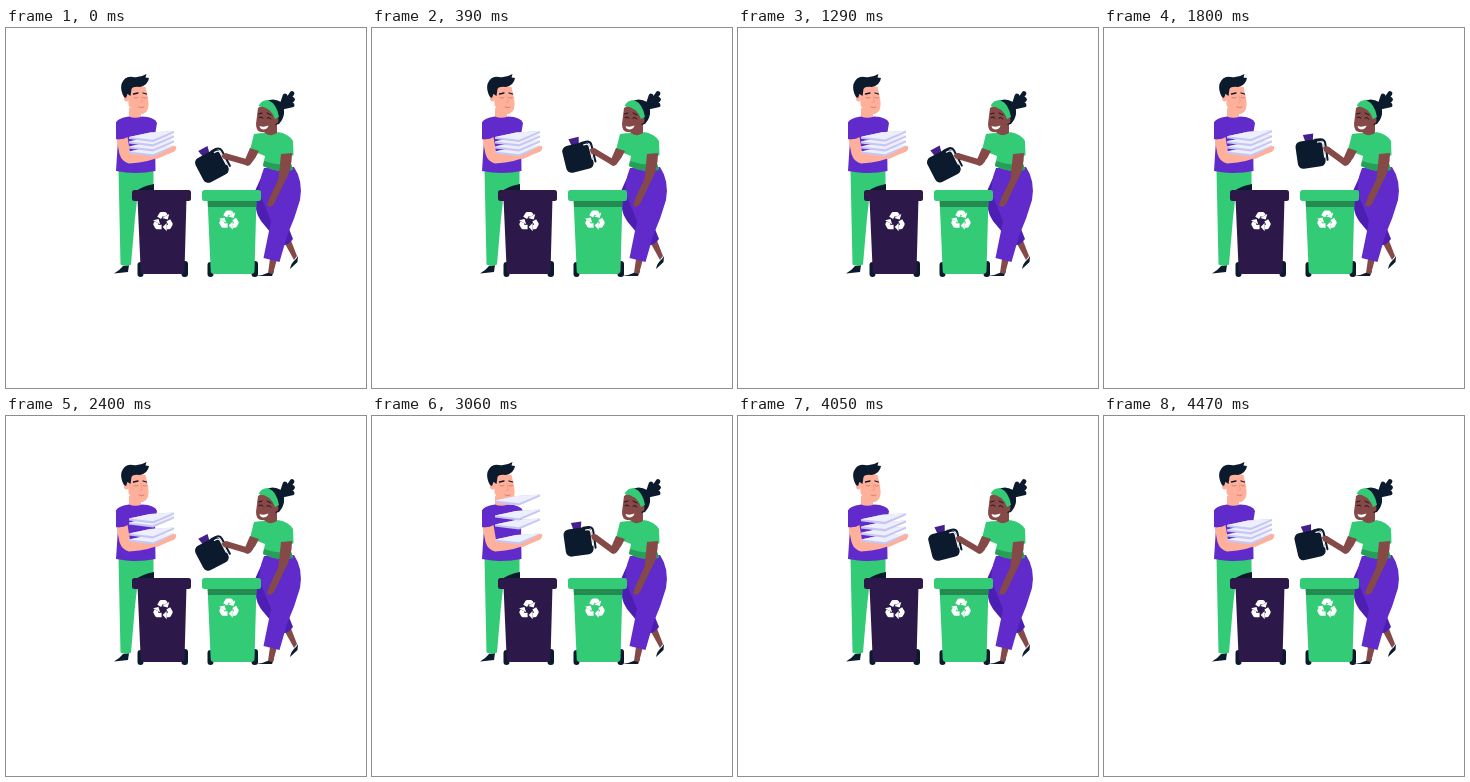
These frames come from a looping animation (360x360 px, 4.5 s). An HTML page:

```html
<!DOCTYPE html>
<html lang="en">
<head>
<meta charset="utf-8">
<style>
html, body { margin: 0; width: 100%; height: 100%; overflow: hidden; background: #fff }
svg { display: block; width: 100vw; height: 100vh }
.line { fill: none; stroke-linecap: round; stroke-linejoin: round }
.ink { fill: #0b1a2c }
.green { fill: #33cb76 }
.violet { fill: #602bca }
.peach { fill: #ffb09b }
.brown { fill: #854a48 }
</style>
</head>
<body>
<svg viewBox="0 0 360 360">
  <defs>
    <g id="sheet">
      <path d="M-23 .5-2-4 22-5.500V-3.500L1 5.500-23 2.500Z" fill="#c6c6f3"/>
      <path d="M-23 .5-2-4 22-5.500 1 3.200Z" fill="#eeeffc"/>
    </g>
    <g id="arrow">
      <path d="M-3.500-3.500-1.500-7H1.500L2.500-5.300" fill="none" stroke="#fff" stroke-width="4" stroke-linejoin="round"/>
      <path d="M5.700-7.200 4.300-2.200-.7-3.400Z" fill="#fff"/>
    </g>
    <g id="cycle">
      <use href="#arrow"/><use href="#arrow" transform="rotate(120)"/><use href="#arrow" transform="rotate(240)"/>
    </g>
    <g id="bin">
      <rect class="ink" x="5.500" y="72" width="6" height="15" rx="3"/>
      <rect class="ink" x="49.500" y="71" width="6.500" height="16" rx="3"/>
      <path d="M5.500 8H54.500L52.500 81Q52 84 49 84H12Q9 84 8.700 81Z"/>
      <rect width="59" height="11" rx="2.500"/>
    </g>
  </defs>

  <!-- man -->
  <path class="ink" d="M108 245.500Q114 242 117 238L123 237 122 244Z"/>
  <path class="green" d="M112.500 142H147.500V161L132 164 129 190 125 236.500Q120 239 114.500 236.500Z"/>
  <path class="ink" d="M148 156Q137 158 130 163V172H148Z"/>
  <path class="peach" d="M123 80V89Q128 94 135 89V82Z"/>
  <path class="violet" d="M110 95Q111 90 123 88.500 129 91 136 88.500 149 89 151 95L149 107 149.500 143Q130 147 110 143L112 112Z"/>
  <path class="peach" d="M122 60Q130 56 139.500 59L142 70Q144.500 83 137 86 127 87 122.500 77Z"/>
  <ellipse class="peach" cx="120.500" cy="70" rx="2.500" ry="3.500"/>
  <path class="ink" d="M118 69Q114 62 115.500 56 119 47 127 49 134 50 140.500 46L139.500 49.500 143 50Q142 57 134 59 127 58 125.500 61L124.500 68 121.500 66 120 70Z"/>
  <path class="line" d="M127.500 66 132 65M137 65 140.500 66" stroke="#13152a" stroke-width="1.300"/>
  <path class="line" d="M128 69.500Q130 71 132 69.500M137 69.500Q139 71 140.500 69.500M133 79Q136 80.500 138 79" stroke="#c8746a" stroke-width=".8"/>
  <path class="line" d="M135 68 136.500 74 134 74.500" stroke="#f4988a" stroke-width=".9"/>
  <path class="peach" d="M110.500 111Q117 112 121.500 109L124 124 149 124 161 120 170 118Q171 122 167 124L158 127Q145 134 123 135.500 116 134 113.500 126Z"/>
  <path class="violet" d="M110 94 121 92 122 108Q116 112 110 111Z"/>
  <g id="sheets"></g>
  <path class="peach" d="M145 129 156 126 160 122 166 119 170 118.500 169 123 162 126 151 131Z"/>

  <!-- woman -->
  <path class="ink" d="M284 241Q285 235 290 231L292 228 291.500 234Z"/>
  <path class="brown" d="M278 214 284 210 291 228 288 232Z"/>
  <path class="ink" d="M250 248Q258 247 264 244L268 243 266 248Z"/>
  <path class="brown" d="M264 231H271L267 246 262 245Z"/>
  <path d="M258 143 249.500 162Q247 182 255 193L274 216Q280 220 287 211L275 181Z" fill="#4c1fb2"/>
  <path class="violet" d="M258 140 288 139Q297.500 153 294 172 289 190 281 208L273.500 234 257.500 230 265 193 254 166Q252 155 258 140Z"/>
  <path class="brown" d="M260 95H271V108H258Z"/>
  <path class="green" d="M248 106Q254 105 259 105 266 110 272 104 283 106 287 113L287.500 127 283 130 287 141Q274 146 257 138L259 128 244 122Z"/>
  <path d="M258 133Q273 138 285 136L287 142Q274 146 257 138Z" fill="#279f58"/>
  <path class="brown" d="M275 126 286 125Q286 142 278.500 154L268 176Q264 181 261 177L264 169 272.500 151Z"/>
  <path class="ink" d="M258 74Q267 69 275 74 282 86 273 96L266 98Z"/>
  <g class="line" stroke="#0b1a2c" stroke-width="4.800">
    <path d="M275 80 279 68M276 80 286 65.500M277 79 286.500 71.500M277 79 286 77"/>
  </g>
  <path class="brown" d="M252 80Q258 75 266 81 273 91 269 98 264 105 255 104 250 103 250 96Z"/>
  <ellipse class="brown" cx="270" cy="92" rx="2.500" ry="3.500"/>
  <path class="green" d="M252.500 78Q255 72 262 72 271 76 273 89L269 91Q265 79 252.500 78Z"/>
  <path class="line" d="M252.500 86 256 85M261 85 265 87M253 89.500Q255 88 257 90M261 90Q263 88.500 265 91" stroke="#25121c" stroke-width="1"/>
  <path d="M253.500 98Q258 99.500 262.500 97.500 261.500 101.500 257 101.500 254 101 253.500 98Z" fill="#fff"/>
  <path class="brown" d="M244 120 253 123Q250 130 244 137 240 139 237.500 135Z"/>
  <g id="arm">
    <path class="line" d="M241 134.500 224 122" stroke="#854a48" stroke-width="6"/>
    <g transform="translate(207 125) rotate(-8)">
      <path d="M-5.500-19H5L3.500-12H-4Z" fill="#43208e"/>
      <rect class="ink" x="-14.500" y="-13" width="28" height="27.500" rx="5.500"/>
      <path class="line" d="M6-12.500H11Q15.500-12 15.500-8V9" stroke="#0b1a2c" stroke-width="2"/>
      <path class="line" d="M8-10H10Q13-10 13-7V6" stroke="#fff" stroke-width="1.200"/>
    </g>
    <path class="brown" d="M219 119.500Q222 117 225 119L228 122 225 126 220 123Z"/>
  </g>

  <!-- bins -->
  <use href="#bin" x="126" y="162" fill="#2c1949"/>
  <use href="#bin" x="196" y="162" class="green"/>
  <path d="M201.700 173H250.300L250 179H202Z" fill="#238a52"/>
  <use href="#cycle" transform="translate(157 193.800) scale(1.100)"/>
  <use href="#cycle" transform="translate(223 192.300) scale(1.100)"/>
</svg>
<script>
const LOOP = 4500, SWING = 1220;
const times = [0, 1700, 2400, 3060, 3660, 4350, LOOP];
// Heights of the sheets, bottom first
const heights = [
  [123, 123, 123, 123, 123, 123, 123],
  [118, 118, 117, 108, 112.5, 118, 118],
  [113, 113, 106, 99, 103.5, 113, 113],
  [108.5, 108, 102, 84, 91, 108.5, 108.5]
];
const arm = document.getElementById('arm');
const stack = document.getElementById('sheets');
const sheets = heights.map(() => {
  const sheet = document.createElementNS('http://www.w3.org/2000/svg', 'use');
  sheet.setAttribute('href', '#sheet');
  return stack.appendChild(sheet);
});

// Smooth curve through the keys, flat at every turning point
function sample(keys, t) {
  let i = 0;
  while (t >= times[i + 1]) i++;
  const slope = k => {
    if (k < 1 || k > times.length - 2) return 0;
    const a = (keys[k] - keys[k - 1]) / (times[k] - times[k - 1]);
    const b = (keys[k + 1] - keys[k]) / (times[k + 1] - times[k]);
    return a * b > 0 ? 2 * a * b / (a + b) : 0;
  };
  const span = times[i + 1] - times[i], u = (t - times[i]) / span, v = 1 - u;
  return v * v * (1 + 2 * u) * keys[i] + u * u * (3 - 2 * u) * keys[i + 1]
    + span * u * v * (v * slope(i) - u * slope(i + 1));
}

function draw() {
  const t = performance.now() % LOOP;
  const angle = -10 - 10 * Math.cos(2 * Math.PI * t / SWING);
  arm.setAttribute('transform', `rotate(${angle} 241 134)`);
  sheets.forEach((sheet, i) =>
    sheet.setAttribute('transform', `translate(146 ${sample(heights[i], t)})`));
  requestAnimationFrame(draw);
}
draw();
</script>
</body>
</html>
```
